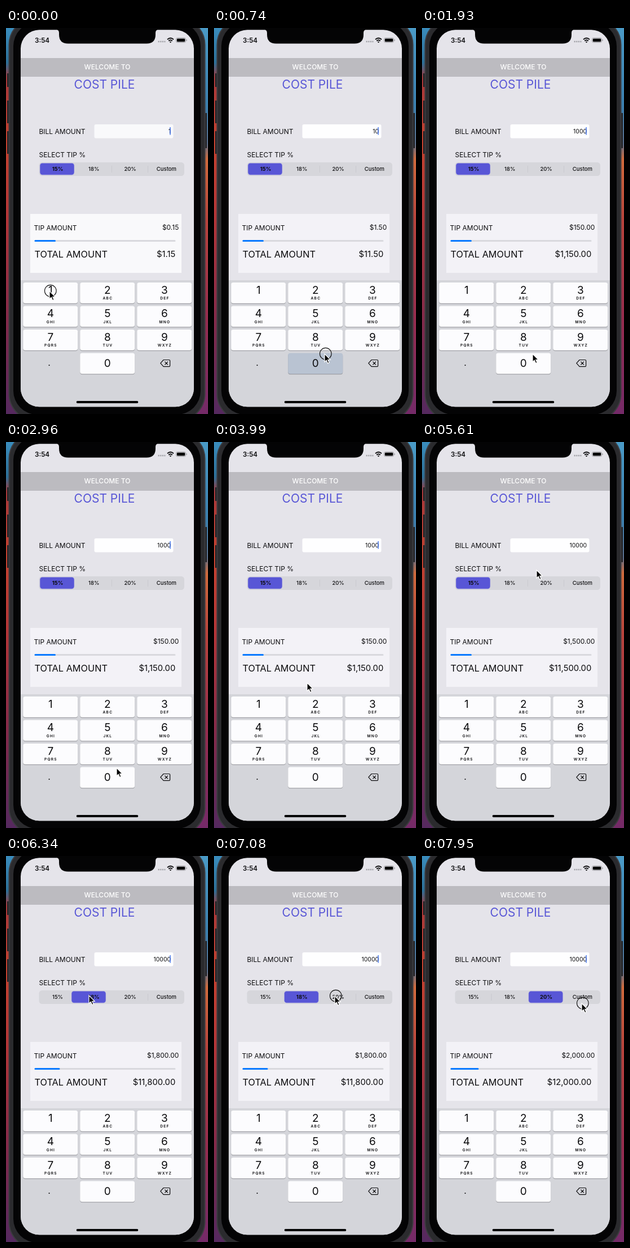
An HTML page for the animation above (8 s loop, 358x681 px).

```html
<!DOCTYPE html>
<html lang="en">
<head>
<meta charset="utf-8">
<title>Tip calculator</title>
<style>
  html, body { margin: 0; width: 100%; height: 100%; overflow: hidden; background: #111; }
  svg { display: block; width: 358px; height: 681px; font-family: Inter, Roboto, sans-serif; }
  text { fill: #0c0c0e; font-size: 12px; }
  .mid { text-anchor: middle; }
  .end { text-anchor: end; }
  .digit { font-size: 19px; }
  .letters { font-size: 6.6px; font-weight: 600; letter-spacing: 1.2px; }
  .segment { font-size: 9.5px; font-weight: 500; }
  .segment.on { font-weight: 700; }
</style>
</head>
<body>
<svg viewBox="0 0 358 681">
  <defs>
    <linearGradient id="wallLeft" x2="0" y2="1">
      <stop offset="0" stop-color="#3a8dbd"/><stop offset=".09" stop-color="#2d6f97"/>
      <stop offset=".13" stop-color="#a8383a"/><stop offset=".3" stop-color="#c4422f"/>
      <stop offset=".5" stop-color="#b23538"/><stop offset=".75" stop-color="#842a4a"/>
      <stop offset="1" stop-color="#55295f"/>
    </linearGradient>
    <linearGradient id="wallRight" x2="0" y2="1">
      <stop offset="0" stop-color="#4a9ac6"/><stop offset=".2" stop-color="#3b7fae"/>
      <stop offset=".3" stop-color="#5b6f8c"/><stop offset=".34" stop-color="#cf6a3c"/>
      <stop offset=".5" stop-color="#b8433c"/><stop offset=".75" stop-color="#962c4e"/>
      <stop offset="1" stop-color="#742a68"/>
    </linearGradient>
  </defs>

  <!-- Wallpaper and phone -->
  <rect width="179" height="681" fill="url(#wallLeft)"/>
  <rect x="179" width="179" height="681" fill="url(#wallRight)"/>
  <path d="M2 80h6v24H2zM2 128h6v40H2zM2 182h6v40H2zM351 150h5v62h-5z" fill="#242427"/>
  <rect x="5.5" y="-18" width="347" height="711" rx="48" fill="#2b2b2e" stroke="#3c3c40" stroke-width="2"/>
  <rect x="13" y="-10" width="332" height="692" rx="42" fill="#040405"/>
  <rect x="26" y="3.3" width="307" height="665" rx="33" fill="#e5e4ea"/>
  <path d="M26 445H333V635.3a33 33 0 0 1-33 33H59a33 33 0 0 1-33-33z" fill="#d4d5da"/>
  <path d="M88 2.5q6 .5 6 6v3q0 16 16 16H249q16 0 16-16V8.5q0-5.5 6-6z" fill="#040405"/>
  <rect x="124.7" y="658" width="109.6" height="4" rx="2" fill="#000"/>

  <!-- Status bar -->
  <text x="51" y="25.5" style="font-size:11.7px;font-weight:600">3:54</text>
  <path d="M269.5 24h13" stroke="#a5a5ab" stroke-width="2.4" stroke-dasharray="2.4 1.2"/>
  <g fill="none" stroke="#0c0c0e" stroke-width="1.8">
    <path d="M286 20.2q5.5-4.8 11 0M288.2 22.7q3.3-2.8 6.6 0"/>
    <rect x="301.5" y="17.5" width="17" height="8" rx="2.3" stroke="#8f8f94" stroke-width=".8"/>
  </g>
  <path d="M291.5 26.3l-1.8-2q1.8-1.3 3.6 0z"/>
  <rect x="302.8" y="18.8" width="14.4" height="5.4" rx="1.3"/>
  <path d="M319.6 20v3q1.2-.4 1.2-1.5t-1.2-1.5" fill="#8f8f94"/>

  <!-- Header and form -->
  <rect x="26" y="53" width="307" height="33" fill="#bcbbc0"/>
  <text class="mid" x="179.5" y="73.4" style="fill:#fff;font-weight:500">WELCOME TO</text>
  <text class="mid" x="174.5" y="106.5" style="fill:#5856d6;font-size:21px">COST PILE</text>
  <text x="58.5" y="186.5">BILL AMOUNT</text>
  <rect id="field" x="156.5" y="170" width="140" height="24.5" rx="3"/>
  <text id="bill" class="end" x="292" y="186" style="font-size:10.4px"></text>
  <rect id="caret" x="290.3" y="175" width="1.4" height="13.5" fill="#3267e8"/>
  <text x="58.5" y="227.5">SELECT TIP %</text>
  <rect x="58.5" y="237" width="257.5" height="24" rx="5.5" fill="#d6d6db"/>
  <g id="separators" fill="#c6c6cc"></g>
  <rect id="selection" y="238.3" width="61" height="20.9" rx="4.5" fill="#5856d6" stroke="#c9c8e2" stroke-width=".6"/>
  <g id="segments"></g>

  <!-- Results -->
  <rect id="panel" x="43" y="328" width="268" height="104"/>
  <text x="49.5" y="356.5">TIP AMOUNT</text>
  <text id="tip" class="end" x="306.3" y="356"></text>
  <rect x="50.5" y="374" width="250" height="3" rx="1.5" fill="#d9d9de"/>
  <rect id="progress" x="50.5" y="374" height="3" rx="1.5" fill="#0a7aff"/>
  <text x="50.5" y="405.3" style="font-size:16.3px">TOTAL AMOUNT</text>
  <text id="total" class="end" x="300.3" y="404" style="font-size:14.8px"></text>

  <!-- Keypad -->
  <g id="keys"></g>
  <text class="mid" x="76.5" y="596" style="font-size:16px">.</text>
  <path d="M279.2 585.5H289q1.6 0 1.6 1.6v8.6q0 1.6-1.6 1.6h-9.8l-5.4-5.9zM281.4 588.6l5.6 5.6m0-5.6l-5.6 5.6"
        fill="none" stroke="#0c0c0e" stroke-width="1.2" stroke-linejoin="round"/>

  <!-- Pointer -->
  <g id="pointer">
    <circle id="ring" cx="1.8" cy="-.3" r="10.3" fill="none" stroke="#111" stroke-width="1.1"/>
    <path d="M0 0V14.2L3.3 11.2L5.6 16.6L8.1 15.5L5.8 10.3H10.2Z" fill="#000" stroke="#fff" stroke-width="1.2"/>
  </g>
</svg>
<script>
const LOOP = 8000, TICK = 147.2;
const SEGMENT_WIDTH = 64.3;
const $ = id => document.getElementById(id);
const svgInto = (id, markup) => { $(id).innerHTML = markup; };

// All timings below are in ticks: the screen refreshes once per tick.
const typed = [[0, "1"], [5, "10"], [7, "100"], [10, "1000"], [33, "10000"]];
const rates = [[0, 15], [43, 18], [49, 20]];
const clicks = [[0, 0], [5, 6], [10, 11], [32, 33], [41, 42], [48, 48], [54, 54]];
const keyColors = [[0, "#fcfcfe"], [5, "#b9c3d2"], [7, "#fcfcfe"], [10, "#b9c3d2"], [12, "#e4e8ee"], [13, "#fcfcfe"]];
const panelColors = [[0, "#f9f9fb"], [1, "#f3f2f7"]];
const fieldColors = [[0, "#f9f9fb"], [1, "#fefeff"]];
const selectionPath = [[42, 60], [43, 116], [44, 124.4], [48, 124.4], [49, 176], [50, 188.8]];
const pointerPath = [
  [0, 77, 464], [1, 103, 496], [2, 165, 556], [3, 196, 575], [22, 196, 575],
  [23, 194, 583], [25, 150, 480], [27, 165, 425], [28, 170, 440], [30, 185, 582],
  [31, 187, 596], [33, 187, 596], [35, 199, 460], [37, 205, 262], [38, 203, 226],
  [39, 190, 229], [41, 147, 246], [45, 147, 246], [48, 214, 247], [50, 220, 248],
  [53, 281, 259], [54, 283, 260]
];

const latest = (list, tick) => list.filter(([start]) => start <= tick).pop();

function along(path, tick) {
  const next = path.findIndex(([at]) => at > tick);
  if (next < 0) return path[path.length - 1].slice(1);
  if (next === 0) return path[0].slice(1);
  const [t0, ...from] = path[next - 1], [t1, ...to] = path[next];
  return from.map((v, i) => v + (to[i] - v) * (tick - t0) / (t1 - t0));
}

const money = v => "$" + v.toLocaleString("en-US", { minimumFractionDigits: 2, maximumFractionDigits: 2 });

svgInto("separators", [1, 2, 3].map(i =>
  `<rect x="${58.3 + i * SEGMENT_WIDTH}" y="243" width=".8" height="12"/>`).join(""));

svgInto("segments", ["15%", "18%", "20%", "Custom"].map((label, i) =>
  `<text class="segment mid" x="${91.5 + i * SEGMENT_WIDTH}" y="252.2">${label}</text>`).join(""));

const letters = ["", "ABC", "DEF", "GHI", "JKL", "MNO", "PQRS", "TUV", "WXYZ"];
function key(digit, col, row, caption = "") {
  const x = 30.2 + col * 101, y = 449 + row * 41.5, center = x + 48.6;
  return `<rect x="${x}" y="${y + 1}" width="97" height="36.8" rx="4" fill="#929398"/>
    <rect id="key${digit}" x="${x}" y="${y}" width="97" height="36.8" rx="4" fill="#fcfcfe"/>
    <text class="digit mid" x="${center}" y="${y + (digit ? 19.5 : 24.7)}">${digit}</text>
    <text class="letters mid" x="${center + .6}" y="${y + 30.2}">${caption}</text>`;
}
svgInto("keys", letters.map((caption, i) =>
  key(i + 1, i % 3, Math.floor(i / 3), caption)).join("") + key(0, 1, 3));

const segmentLabels = [...$("segments").children];
const separators = [...$("separators").children];

function draw(tick) {
  const [typedAt, bill] = latest(typed, tick);
  const rate = latest(rates, tick)[1];
  const tip = bill * rate / 100;
  $("bill").textContent = bill;
  $("tip").textContent = money(tip);
  $("total").textContent = money(+bill + tip);
  $("progress").setAttribute("width", rate * 2.5);
  $("panel").setAttribute("fill", latest(panelColors, tick)[1]);
  $("field").setAttribute("fill", latest(fieldColors, tick)[1]);
  $("key0").setAttribute("fill", latest(keyColors, tick)[1]);

  const blink = (tick - typedAt) / 6.8 % 1;
  $("caret").setAttribute("visibility", blink < .7 ? "visible" : "hidden");

  const selected = rates.findIndex(r => r[1] === rate);
  $("selection").setAttribute("x", along(selectionPath, tick)[0]);
  segmentLabels.forEach((label, i) => label.classList.toggle("on", i === selected));
  separators.forEach((line, i) =>
    line.setAttribute("visibility", i === selected || i === selected - 1 ? "hidden" : "visible"));

  $("pointer").setAttribute("transform", `translate(${along(pointerPath, tick)})`);
  const pressed = clicks.some(([down, up]) => tick >= down && tick <= up);
  $("ring").setAttribute("visibility", pressed ? "visible" : "hidden");
}

const start = performance.now();
function frame(now) {
  draw(Math.floor(Math.max(0, now - start) % LOOP / TICK));
  requestAnimationFrame(frame);
}
draw(0);
requestAnimationFrame(frame);
</script>
</body>
</html>
```
